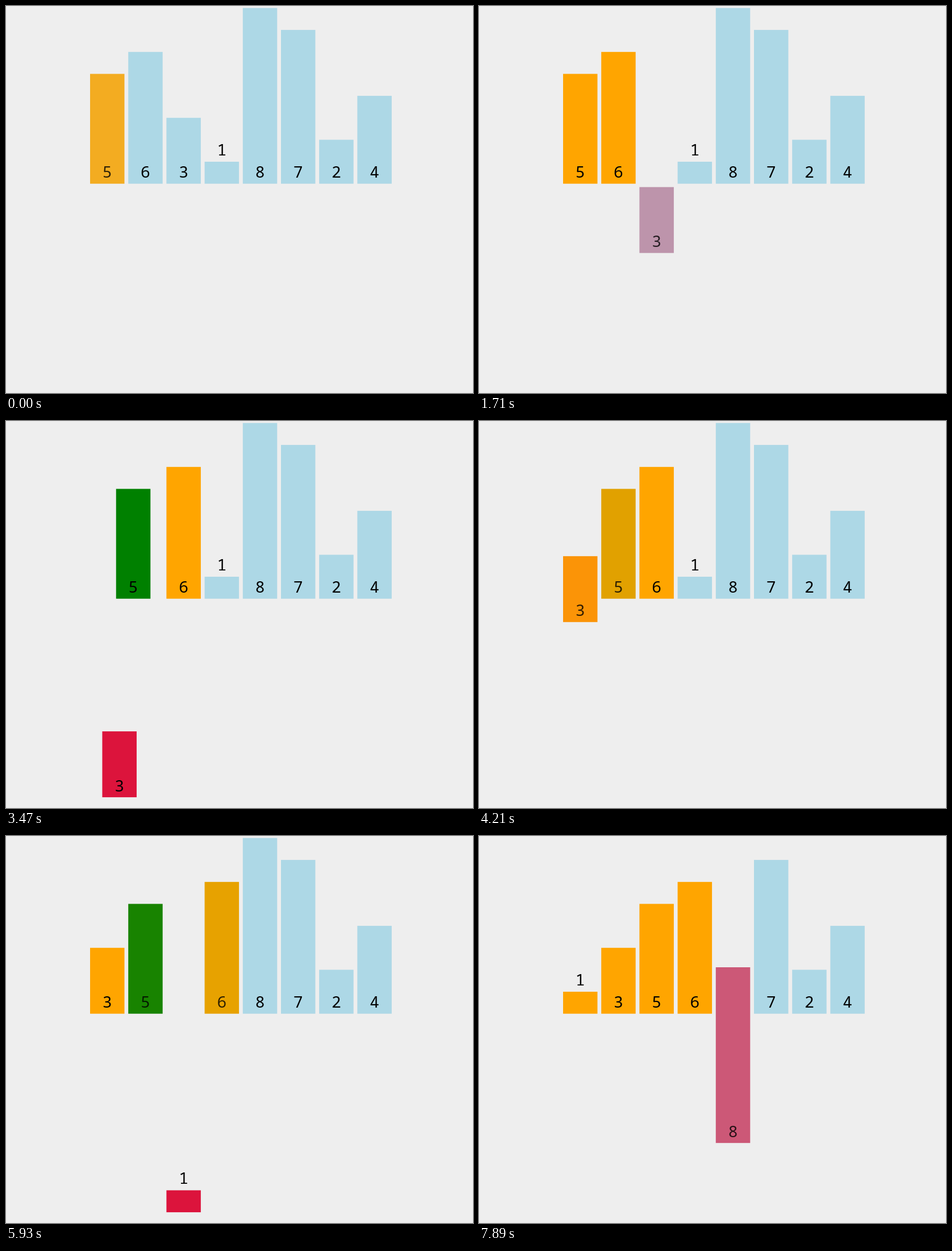
An HTML page that plays this animation: 822x681 px, repeating every 8 s.

```html
<!DOCTYPE html>
<html lang="en">
<head>
<meta charset="utf-8">
<title>Insertion sort</title>
<style>
  html, body { margin: 0; width: 100%; height: 100%; overflow: hidden; background: #eee; }
  svg { display: block; width: 822px; height: 681px; }
  text { font: 28px "Noto Sans Mono", "DejaVu Sans Mono", monospace; text-anchor: middle; }
</style>
</head>
<body>
<svg id="stage" viewBox="0 0 822 681"></svg>
<script>
const LOOP = 8000, LAST = 7890;
const LEFT = 148, PITCH = 67.2, WIDTH = 60.5, UNIT = 38.65;
const FLOOR = 312.7, DROP = 349.4;
const IDLE = [173, 216, 230], SORTED = [255, 165, 0], PICKED = [220, 20, 60], COMPARED = [0, 128, 0];
const VALUES = [5, 6, 3, 1, 8, 7, 2, 4];

// Each beat plays two moves of equal length back to back, then rests.
const MOVE = 230;
const BEATS = [-383, 500, 1379, 2287, 3110, 4052, 4890, 5767, 6700, 7532];
const STARTS = BEATS.flatMap(t => [t, t + MOVE]);

// Every state of the sort, as { slot, low, color } per value.
function sortStates() {
  const bars = {};
  const order = [...VALUES];
  VALUES.forEach((v, slot) => bars[v] = { slot, low: 0, color: IDLE });
  const states = [];
  const push = () => states.push(
    Object.fromEntries(VALUES.map(v => [v, { ...bars[v] }])));

  push();
  push();
  bars[order[0]].color = SORTED;
  push();
  for (let i = 1; i < order.length; i++) {
    const key = order[i];
    Object.assign(bars[key], { low: 1, color: PICKED });
    push();
    for (let j = i - 1; j >= 0; j--) {
      const other = order[j];
      bars[other].color = COMPARED;
      if (j + 1 < i) bars[order[j + 2]].color = SORTED;
      push();
      if (other < key) break;
      order[j + 1] = other;
      order[j] = key;
      bars[other].slot = j + 1;
      bars[key].slot = j;
      push();
    }
    for (const v of order.slice(0, i + 1)) Object.assign(bars[v], { low: 0, color: SORTED });
    push();
  }
  return states;
}

const STATES = sortStates();
const mix = (a, b, p) => a + (b - a) * p;
const ease = u => u < 0.5 ? 4 * u ** 3 : 1 - 4 * (1 - u) ** 3;

const stage = document.getElementById("stage");
const add = (tag, attrs, parent) => {
  const el = document.createElementNS("http://www.w3.org/2000/svg", tag);
  for (const k in attrs) el.setAttribute(k, attrs[k]);
  return parent.appendChild(el);
};

const views = VALUES.map(value => {
  const group = add("g", {}, stage);
  const rect = add("rect", { width: WIDTH, height: value * UNIT, y: -value * UNIT }, group);
  const label = add("text", { x: WIDTH / 2, y: value > 1 ? -10.5 : -50 }, group);
  label.textContent = value;
  return { value, group, rect, label };
});

function draw(time) {
  const t = Math.min(time, LAST);
  const n = STARTS.findLastIndex(start => start <= t);
  const p = ease(Math.min(1, (t - STARTS[n]) / MOVE));
  for (const { value, group, rect, label } of views) {
    const a = STATES[n][value], b = STATES[n + 1][value];
    const x = LEFT + PITCH * mix(a.slot, b.slot, p);
    const y = FLOOR + DROP * mix(a.low, b.low, p);
    group.setAttribute("transform", `translate(${x} ${y})`);
    rect.setAttribute("fill", `rgb(${a.color.map((c, i) => Math.round(mix(c, b.color[i], p)))})`);
    // Labels pale a little while their bar changes colour.
    label.setAttribute("opacity", a.color !== b.color && p < 1 ? 0.8 : 1);
  }
}

const origin = performance.now();
function loop() {
  draw((performance.now() - origin) % LOOP);
  requestAnimationFrame(loop);
}
loop();
</script>
</body>
</html>
```
